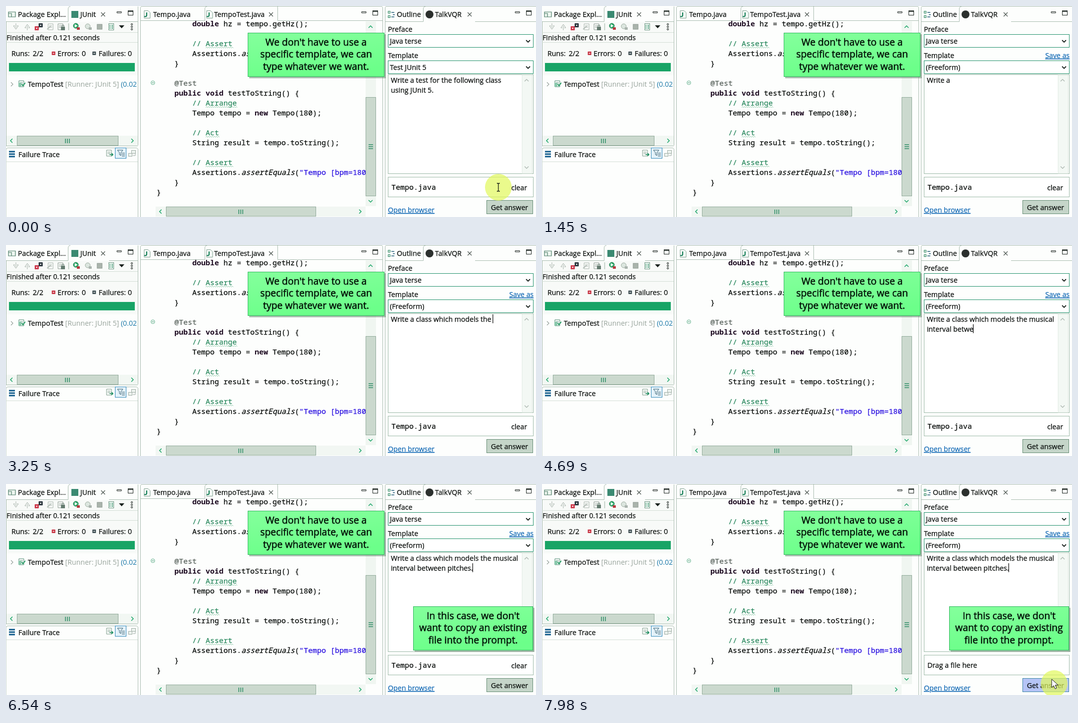
Animation, 1070 px wide and 426 px high, one loop 8000 ms. Source, as an HTML page:

```html
<!DOCTYPE html>
<html lang="en">
<head>
<meta charset="utf-8">
<title>Free-form prompt</title>
<style>
html, body { margin: 0; width: 100%; height: 100%; overflow: hidden; background: #fdfefd; }
svg { display: block; width: 1070px; height: 426px; }
text { font: 14.2px "Open Sans", "Noto Sans", sans-serif; fill: #080c0a; stroke: #080c0a; stroke-width: .25px; white-space: pre; }
.code { font: 15px "Noto Sans Mono", "DejaVu Sans Mono", monospace; }
.kw { font-weight: 700; fill: #1c0a20; stroke: none; }
.cm { fill: #2c8a60; stroke: #2c8a60; }
.str { fill: #2a10e0; stroke: #2a10e0; }
.an { fill: #5a645e; stroke: #5a645e; }
.it { font-style: italic; }
.dim { fill: #98a49c; stroke: none; }
.blue { fill: #1a78a8; stroke: none; }
.link { fill: #1068b4; stroke: #1068b4; text-decoration: underline; }
.note { font-size: 19.4px; text-anchor: middle; fill: #021006; stroke: #021006; stroke-width: .5px; }
.picked { fill: #fff; stroke: #fff; }
</style>
</head>
<body>
<svg id="stage" viewBox="0 0 1070 426" xmlns="http://www.w3.org/2000/svg">
  <defs>
    <linearGradient id="mint" x2=".3" y2="1">
      <stop offset="0" stop-color="#84ff9c"/>
      <stop offset="1" stop-color="#6cff8a"/>
    </linearGradient>
    <clipPath id="editor"><rect x="273" y="30" width="453" height="374"/></clipPath>
    <clipPath id="tree"><rect x="0" y="140" width="265" height="40"/></clipPath>
  </defs>
  <g id="scene"></g>
  <g id="pointer">
    <circle r="27" fill="#e2f85c" fill-opacity=".7"/>
    <path id="beam" d="M-3-8H-1L0-7 1-8H3M0-7V7M-3 8H-1L0 7 1 8H3" fill="none" stroke="#101810" stroke-width="1.3"/>
    <circle id="ring" cx="-5" cy="-8" r="9.5" fill="none" stroke="#c4222e" stroke-width="3"/>
    <path id="arrow" d="M-5-9V8L-1 4 2 10.500 5 9 2 3H8Z" fill="#fff" stroke="#101010"/>
  </g>
  <g id="notes"></g>
</svg>
<script>
const $ = id => document.getElementById(id);
const INK = '#18201c', GREEN = '#18a466', EDGE = '#a9bcb0', SOFT = '#d3ded6';

const text = (x, y, s, cls = '', id = '') => `<text x="${x}" y="${y}" class="${cls}" id="${id}">${s}</text>`;
const rect = (x, y, w, h, fill, stroke = 'none', extra = '') =>
  `<rect x="${x}" y="${y}" width="${w}" height="${h}" fill="${fill}" stroke="${stroke}" ${extra}/>`;
const path = (d, stroke = INK, width = 1, fill = 'none') =>
  `<path d="${d}" fill="${fill}" stroke="${stroke}" stroke-width="${width}"/>`;
const dot = (x, y, r, fill, stroke = 'none') => `<circle cx="${x}" cy="${y}" r="${r}" fill="${fill}" stroke="${stroke}"/>`;

// Chevron pointing u, d, l or r
const chevron = (x, y, dir, color = GREEN, width = 1.5, s = 4) => {
  const turn = { d: 0, l: 90, u: 180, r: 270 }[dir];
  return `<g transform="translate(${x} ${y}) rotate(${turn})">${path(`M${-s}${-s / 2}L0 ${s / 2} ${s}${-s / 2}`, color, width)}</g>`;
};
const cross = (x, y) => path(`M${x - 4} ${y - 4}l8 8m0-8l-8 8`, '#4a544e', 1.2);
const windowButtons = x => path(`M${x - 4} 11.500h9v2.500h-9z`) +
  rect(x + 18.5, 9.5, 10, 9, 'none', INK) + path(`M${x + 18} 11h11`, INK, 1.5);
const squiggle = (x, y, n) => path(`M${x} ${y}` + 'l2-2 2 2'.repeat(Math.round(n * 9 / 4)), '#8cc8a8', .9);

const fileIcon = x => path(`M${x} 9.500h8l4 4v11h-12z`, '#7c9c8c', 1, '#f8fdfa') +
  path(`M${x + 5} 13v6q0 3-5 2`, '#127c54', 2.2);
const page = (x, y, color) => path(`M${x - 5} ${y - 6}h10v12h-10zM${x - 3} ${y - 2}h6m-6 3h6`, color);

function leftPanel() {
  const bad = (x, color) => rect(x - 3.5, 92, 7, 7, color) + path(`M${x - 1.5} 94l3 3m0-3l-3 3`, '#fff');
  return rect(1, 32, 265, 108, '#f8faf8') +
    path('M0 31.500H125.500V6Q125.500 1 130 1M208 31.500H266.500M266.500 1V281.500M0 282.500H266M0 426V290Q0 286.500 4 286.500H262Q266.500 286.500 266.500 290V426M0.500 32V282', EDGE) +
    path('M5 12h14v10H5zM5 15h6v7', '#4c7c68', 1.2, '#eef6f0') + text(24, 22, 'Package Expl...') +
    rect(132, 10, 14, 14, '#3b8a72') + text(150, 22, 'JUnit') + cross(196, 17) + windowButtons(228) +
    path('M20 35v9m-5-4h3m4 0h3l-5 7-5-7', '#a4b0a8') + path('M43 49v-9m-5 4h3m4 0h3l-5-7-5 7', '#a4b0a8') +
    rect(58, 41, 8, 8, '#c8283c') + rect(66, 35, 8, 8, '#18242c') + path('M60 43l4 4m0-4l-4 4M68 37l4 4m0-4l-4 4', '#fff') +
    page(90, 42, '#a8b4ac') + path('M83 47l7-6', '#b4beb8', 2) +
    page(110, 42, '#8a9890') + rect(111, 42, 8, 7, '#647c70') + path('M113 42v-3h4v3', '#647c70') +
    path('M126.500 35v14', '#b4c4ba', 1.5) +
    dot(141, 40, 5, '#30ac6c', '#167848') + path('M139 37l5 3-5 3z', '#fff', .5, '#fff') + rect(143, 43, 6, 5, '#b83a40') +
    dot(165, 41, 5, '#dce6df', '#9cac9f') + rect(167, 43, 6, 5, '#aab4ae') +
    rect(184, 37, 10, 10, '#aab4ac', '#8e9a92') +
    rect(207.5, 35.5, 10, 13, '#f4faf6', '#6a9480') + path('M209 39h2m2 0h3m-7 3h2m2 0h3m-7 3h2m2 0h3', '#2c8c64', 1.5) +
    path('M228 39h11l-5.500 6z', 'none', 0, INK) + [37, 42, 47].map(y => dot(254, y, 1.6, 'none', INK)).join('') +
    path('M0 53.500H266M0 73.500H266', SOFT) + text(1, 69, 'Finished after 0.121 seconds') +
    text(11, 101, 'Runs:') + text(54, 101, '2/2') + bad(96, '#c42838') + text(104, 101, 'Errors:') + text(153, 101, '0') +
    bad(178, '#35464a') + text(187, 101, 'Failures:') + text(246, 101, '0') +
    rect(6, 115, 254, 17, GREEN) +
    chevron(12, 158, 'r', '#95a09a', 1.2) + page(31, 157, '#4c8870') + rect(25, 155, 6, 8, '#8ac8ac') + path('M32 158l2 3 5-6', '#149458', 1.7) +
    `<g clip-path="url(#tree)">${text(44, 163, 'TempoTest <tspan class="dim">[Runner: JUnit 5]</tspan> <tspan class="blue">(0.02</tspan>')}</g>` +
    rect(1, 262, 265, 20, '#f2f7f3') + rect(22.5, 262.5, 204, 19, '#cbd9ce', '#91aa9a') +
    path('M120 268v9m4-9v9m4-9v9', '#2b8c64', 1.5) + chevron(11, 272, 'l') + chevron(255, 272, 'r') +
    path('M6 294h12M6 299h12M6 304h12', '#125c8c', 3) + text(25, 305, 'Failure Trace') +
    page(208, 297, '#769684') + path('M209 300h7m-3-3l3 3-3 3', '#168c5c', 1.5) +
    rect(220.5, 286.500, 22, 21, '#e4f2fa', '#3088b8') + path('M225 291h11l-4 5v6l-3-2v-4zM234 297h6m-6 3h6m-6 3h6', '#345c6c') +
    rect(247.5, 297.5, 7, 6, '#eef4f0', '#9eaca4') + rect(253.5, 291.5, 8, 6, '#eef4f0', '#9eaca4') + path('M256 302h5v-4', '#9eaca4') +
    path('M0 314.500H266', SOFT);
}

// [column, row centre, markup, length of the underlined word]; columns are 9 px wide
const SOURCE = [
  [8, 36, '<tspan class="kw">double</tspan> hz = tempo.getHz();'],
  [8, 76, '<tspan class="cm">// Assert</tspan>', 6],
  [8, 96, 'Assertions.<tspan class="it">assertEquals</tspan>('],
  [4, 116, '}'],
  [4, 156, '<tspan class="an">@Test</tspan>'],
  [4, 176, '<tspan class="kw">public void</tspan> testToString() {'],
  [8, 196, '<tspan class="cm">// Arrange</tspan>', 7],
  [8, 216, 'Tempo tempo = <tspan class="kw">new</tspan> Tempo(180);'],
  [8, 256, '<tspan class="cm">// Act</tspan>', 3],
  [8, 276, 'String result = tempo.toString();'],
  [8, 316, '<tspan class="cm">// Assert</tspan>', 6],
  [8, 336, 'Assertions.<tspan class="it">assertEquals</tspan>(<tspan class="str">"Tempo [bpm=180]"</tspan>, result);'],
  [4, 356, '}'],
  [0, 376, '}']
];

function editorPanel() {
  const lines = SOURCE.map(([col, y, s, wavy]) => {
    const x = 304 + col * 9;
    return text(x, y + 5, s, 'code') + (wavy ? squiggle(x + 27, y + 9, wavy) : '');
  }).join('');
  return path('M271.500 426V4Q271.500 .500 276 .500H756Q760.500 .500 760.500 4V426M272 29.500H401.500V6Q401.500 1 406 1M548.500 1V29.500H760', EDGE) +
    fileIcon(279) + text(297, 22, 'Tempo.java') + fileIcon(405) + text(420, 22, 'TempoTest.java') + cross(535, 17) + windowButtons(722) +
    `<g clip-path="url(#editor)">${lines}</g>` +
    dot(296.5, 155, 3.8, '#fdfefd', '#5cae88') + path('M294.500 155h4', '#288c60') +
    rect(726, 31, 21, 373, '#f0f6f1') + rect(726.5, 184.5, 20, 199, '#cbd9ce', '#91aa9a') +
    path('M732 280h9m-9 4h9m-9 4h9', '#2b8c64', 1.5) + chevron(736, 42, 'u') + chevron(736, 394, 'd') +
    rect(302, 405, 424, 20, '#f2f7f3') + rect(323.5, 405.5, 302, 19, '#cbd9ce', '#91aa9a') +
    path('M470 411v9m4-9v9m4-9v9', '#2b8c64', 1.5) + chevron(312, 415, 'l') + chevron(715, 415, 'r');
}

function promptPanel() {
  const combo = (y, h) => rect(771.5, y + .5, 293, h, '#fff', '#20906a') + chevron(1054, y + 14, 'd', INK, 1.8);
  return path('M765.500 426V4Q765.500 .500 770 .500H1070M766 31.500H842.500V6Q842.500 1 847 1M947 31.500H1070', EDGE) +
    rect(771.5, 10.5, 4, 4, '#dff0e6', '#2c8460') + rect(771.5, 19.5, 4, 4, '#dff0e6', '#2c8460') + path('M778 13h6m-6 9h6m-3-4.500h4', '#28607c', 1.6) +
    text(789, 22, 'Outline') + dot(855, 17, 8, '#2c302e') + text(866, 22, 'TalkVQR') + cross(936, 17) + windowButtons(1032) +
    text(771, 52, 'Preface') + combo(57, 26) + text(775, 76, 'Java terse') +
    text(771, 105, 'Template') + text(1016, 105, 'Save as', 'link', 'save') + combo(110, 26) + text(775, 129, '', '', 'template') +
    rect(771.5, 138.5, 293, 200, '#fff', '#9bb8a6') + rect(1042, 139, 20, 199, '#f3f8f4', '#e0e9e2') +
    chevron(1051, 150, 'u', '#a5b1aa', 1.2) + chevron(1051, 326, 'd', '#a5b1aa', 1.2) +
    `<g id="marked">${rect(777, 141, 232, 20, '#0c74c8')}${rect(777, 161, 85, 20, '#0c74c8')}</g>` +
    text(777, 155, '', '', 'line1') + text(777, 175, '', '', 'line2') +
    rect(0, 0, 1.2, 18, '#000', 'none', 'id="caret"') +
    rect(771.5, 345.5, 293, 40, '#fff', '#9bb8a6') + text(778, 371, 'Tempo.java', 'code', 'file') + text(778, 371, 'Drag a file here', '', 'drop') +
    `<g id="clear">${rect(1015.5, 351.5, 42, 27, '#b4c2f4', '#3c84a4', 'id="clearBox"')}${text(1020, 372, 'clear')}</g>` +
    text(771, 417, 'Open browser', 'link') +
    rect(970.5, 392.5, 93, 27, '#c5d5c9', '#648c74', 'id="answer"') + text(979, 412, 'Get answer');
}

const note = (x, y, w, h, lines, id) => `<g id="${id}">` +
  rect(x + 3, y + 3, w, h, '#6c8c74', 'none', 'opacity=".55"') + rect(x + .5, y + .5, w - 1, h - 1, 'url(#mint)', '#2eb45c') +
  lines.map((s, i) => text(x + w / 2, y + 26 + i * 24.4, s, 'note')).join('') + '</g>';

$('scene').innerHTML = leftPanel() + editorPanel() + promptPanel();
$('notes').innerHTML =
  note(488, 54, 276, 89, ["We don't have to use a", 'specific template, we can', 'type whatever we want.'], 'note1') +
  note(822, 247, 242, 89, ["In this case, we don't", 'want to copy an existing', 'file into the prompt.'], 'note2');

const LOOP = 8000, TICK = 120;
const PROMPT = ['Write a class which models the musical ', 'interval between pitches.'];
const SPANS = [[0, 720], [970, 4930], [5180, 5540], [5790, 5790], [6040, 6040], [6540, 7980]];
const TYPED = [[1090, 0], [1450, 7], [2530, 24], [3250, 31], [3370, 33], [4210, 45], [4690, 53], [4930, 56], [5180, 58], [5540, 63], [5790, 64]];
const MOVES = [[0, 994, 366], [600, 799, 156], [970, 799, 156], [1210, 1010, 269], [6420, 1010, 269], [6900, 1038, 378], [7140, 1038, 378], [7380, 1034, 403]];

function snap(t) {
  const [from, to] = SPANS.filter(s => s[0] <= t).pop();
  return Math.min(to, from + Math.floor((t - from) / TICK) * TICK);
}

function track(keys, t, col, ease = k => k) {
  const i = keys.findIndex(k => k[0] > t);
  if (i < 0) return keys[keys.length - 1][col];
  if (i === 0) return keys[0][col];
  const a = keys[i - 1], b = keys[i];
  return a[col] + (b[col] - a[col]) * ease((t - a[0]) / (b[0] - a[0]));
}

const smooth = k => k * k * (3 - 2 * k);
const show = (id, on) => $(id).setAttribute('visibility', on ? 'inherit' : 'hidden');
const within = (t, a, b) => t >= a && t < b;

function render(now) {
  const t = snap(now % LOOP);
  const typing = t >= 1210;
  const marked = within(t, 970, 1210);
  const count = Math.floor(track(TYPED, t, 1) + .001);
  const split = PROMPT[0].length;
  const lines = typing
    ? [PROMPT[0].slice(0, count), PROMPT[1].slice(0, Math.max(0, count - split))]
    : ['Write a test for the following class', 'using JUnit 5.'];
  lines.forEach((s, i) => {
    const line = $('line' + (i + 1));
    line.textContent = s;
    line.setAttribute('class', marked ? 'picked' : '');
  });
  $('template').textContent = typing ? '(Freeform)' : 'Test JUnit 5';
  show('save', typing);
  show('marked', marked);

  const row = count > split ? 1 : 0;
  $('caret').setAttribute('x', 776 + (lines[row] ? $('line' + (row + 1)).getComputedTextLength() : 0));
  $('caret').setAttribute('y', 140 + row * 20);
  show('caret', t > 1500 && within(t % 1060, 60, 590));

  const cleared = t >= 7140;
  show('file', !cleared);
  show('drop', cleared);
  show('clear', !cleared);
  show('clearBox', within(t, 6780, 7140));
  const hover = t >= 7260;
  $('answer').setAttribute('fill', hover ? '#b5c4f6' : '#c5d5c9');
  $('answer').setAttribute('stroke', hover ? '#3c84a4' : '#648c74');
  show('note2', t >= 6040);

  const late = t >= 6540;
  show('pointer', t < 1330 || late);
  show('beam', !late);
  show('arrow', late);
  show('ring', within(t, 6900, 7140));
  $('pointer').setAttribute('transform', `translate(${track(MOVES, t, 1, smooth)} ${track(MOVES, t, 2, smooth)})`);
}

const start = performance.now();
function frame() {
  render(performance.now() - start);
  requestAnimationFrame(frame);
}
frame();
</script>
</body>
</html>
```
